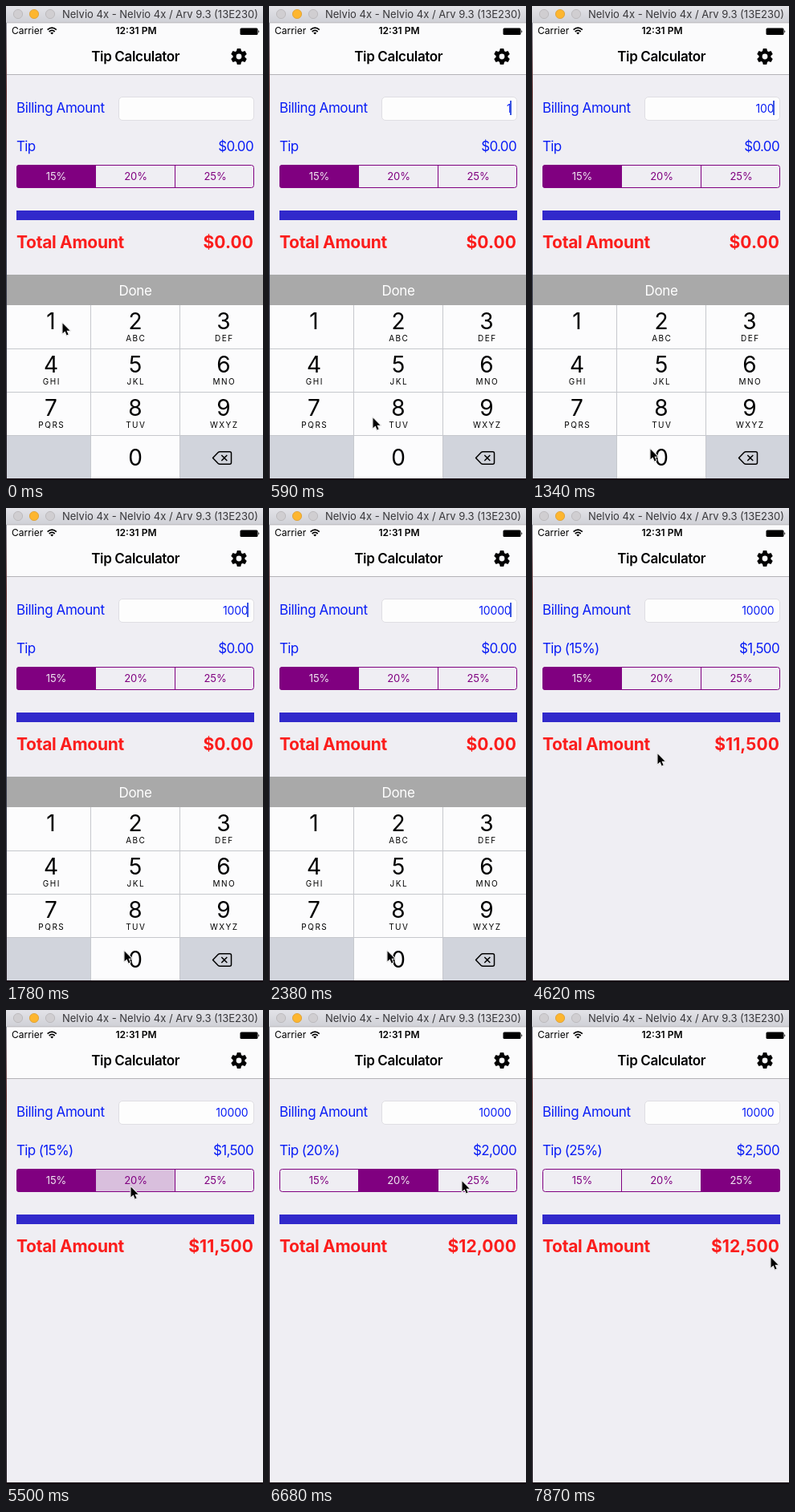
Write an HTML page that moves like this. It is 320x591 px and loops after 8 s.

```html
<!DOCTYPE html>
<html lang="en">
<head>
<meta charset="utf-8">
<title>Tip Calculator</title>
<style>
  html, body { margin: 0; width: 100%; height: 100%; overflow: hidden; background: #efeef3; }
  svg { display: block; width: 320px; height: 591px; font: 17px Inter, "Open Sans", sans-serif; letter-spacing: -.41px; }
  .mid { text-anchor: middle; }
  .end { text-anchor: end; }
  .blue { fill: #0a1ef5; }
  .tip { letter-spacing: -.65px; }
  .total { font-size: 21px; font-weight: 700; letter-spacing: -.3px; fill: #fb1d1c; }
  .total.end { letter-spacing: .1px; }
  .seg { font-size: 13px; letter-spacing: -.08px; }
  .field { font-size: 14px; letter-spacing: -.15px; }
  .status { font-size: 12px; letter-spacing: 0; }
  .window { font-size: 13px; letter-spacing: 0; }
  .digit { font-size: 28px; letter-spacing: 0; }
  .abc { font-size: 10px; letter-spacing: 1.5px; }
  #arrow { filter: drop-shadow(0 .6px .6px #0006); }
</style>
</head>
<body>
<svg viewBox="0 0 320 591">
  <defs>
    <linearGradient id="chrome" x2="0" y2="1">
      <stop stop-color="#e3e3e8"/><stop offset="1" stop-color="#cfd0d6"/>
    </linearGradient>
    <linearGradient id="desk" x2="0" y2="1">
      <stop stop-color="#8a8c98"/><stop offset=".15" stop-color="#5b2a2c"/>
      <stop offset=".5" stop-color="#3c4254"/><stop offset="1" stop-color="#1c141c"/>
    </linearGradient>
    <clipPath id="pill"><rect x="13" y="198" width="296" height="29" rx="3.5"/></clipPath>
    <clipPath id="screen"><rect x="1" y="22" width="319" height="567"/></clipPath>
  </defs>

  <rect width="320" height="591" fill="#efeef3"/>

  <!-- window bar -->
  <rect width="320" height="21" fill="url(#chrome)"/>
  <rect y="20.5" width="320" height="1" fill="#b5b3b6"/>
  <g stroke-width=".8" fill="#d0ced1" stroke="#b6b4b7">
    <circle cx="15" cy="10" r="5.6"/>
    <circle cx="35" cy="10" r="5.6" fill="#fdb62f" stroke="#dc9c2c"/>
    <circle cx="55" cy="10" r="5.6"/>
  </g>
  <text class="window" x="70" y="15" fill="#38373a">Nelvio 4x - Nelvio 4x / Arv 9.3 (13E230)</text>

  <!-- status and navigation -->
  <rect y="21.5" width="320" height="64" fill="#fbfbfc"/>
  <rect y="85" width="320" height="1" fill="#b4b3b7"/>
  <text class="status" x="7" y="35">Carrier</text>
  <g fill="none" stroke="#000" stroke-width="1.7">
    <path d="M51.6 29.6Q57.2 24.6 62.8 29.6M53.7 32Q57.2 28.9 60.7 32"/>
    <path d="M57.2 35.6L55.2 33.4Q57.2 31.9 59.2 33.4Z" fill="#000" stroke="none"/>
  </g>
  <text class="status mid" x="162" y="35" font-weight="600">12:31 PM</text>
  <rect x="291.5" y="27.5" width="22" height="8.5" rx="1.5"/>
  <path d="M314.3 30q2 1.8 0 3.6z"/>
  <text class="mid" x="161.2" y="69" font-weight="600" letter-spacing="-.33">Tip Calculator</text>
  <g id="gear" transform="translate(290 63)">
    <circle r="5.4" fill="none" stroke="#000" stroke-width="4"/>
  </g>

  <!-- form -->
  <text class="blue" x="13" y="133">Billing Amount</text>
  <rect x="140.5" y="113.5" width="168" height="29" rx="4.5" fill="#fdfdfd" stroke="#dfdee3"/>
  <text class="blue field end" id="bill" x="301.5" y="133"></text>
  <rect id="caret" x="300" y="118" width="2" height="18" fill="#3a55e0"/>
  <text class="blue tip" id="tip" x="13" y="181"></text>
  <text class="blue tip end" id="tipSum" x="308" y="181"></text>
  <g id="segments"></g>
  <path d="M111.5 198v29M210.5 198v29" stroke="#800080"/>
  <rect x="13.5" y="198.5" width="295" height="28" rx="3" fill="none" stroke="#800080"/>
  <rect x="13" y="255" width="296" height="12" fill="#3129cb"/>
  <text class="total" x="13" y="302">Total Amount</text>
  <text class="total end" id="total" x="308" y="302"></text>

  <!-- keyboard -->
  <g clip-path="url(#screen)">
    <g id="pad">
      <rect y="335" width="320" height="38" fill="#a9a9a9"/>
      <text class="mid" id="done" x="161" y="361" fill="#fff">Done</text>
      <g id="keys"></g>
      <path d="M105.5 373V589M216.5 373V589M0 427.5H320M0 481.5H320M0 535.5H320" stroke="#c6c8cd"/>
      <path d="M257.5 563.5L264 556.7Q265 555.7 266.5 555.7H278.5Q280.5 555.7 280.5 557.7V569.3Q280.5 571.3 278.5 571.3H266.5Q265 571.3 264 570.3ZM268.3 560l7 7M275.3 560l-7 7"
        fill="none" stroke="#000" stroke-width="1.5" stroke-linejoin="round"/>
    </g>
  </g>

  <rect y="21" width="1" height="570" fill="url(#desk)"/>
  <rect y="589" width="320" height="2" fill="#191217"/>

  <path id="arrow" d="M1.5 1.6V14.3L4.5 11.5L6.6 16.4L8.6 15.5L6.5 10.8H10.6Z" stroke="#fff" stroke-width="2" paint-order="stroke" stroke-linejoin="round"/>
</svg>
<script>
const $ = id => document.getElementById(id);
const add = (parent, tag, attrs, text = "") => {
  const el = document.createElementNS("http://www.w3.org/2000/svg", tag);
  for (const k in attrs) el.setAttribute(k, attrs[k]);
  el.textContent = text;
  return parent.appendChild(el);
};

for (let i = 0; i < 6; i++)
  add($("gear"), "path", { d: "M-3.2-6L-2.2-10H2.2L3.2-6Z", transform: `rotate(${i * 60})` });

// number pad
const WHITE = "#fcfcfd", GREY = "#d1d4dc";
const colX = [0, 106, 217, 320], midX = [56, 161, 271], rowY = [373, 428, 482, 536, 589];
const letters = ["", "ABC", "DEF", "GHI", "JKL", "MNO", "PQRS", "TUV", "WXYZ"];
const keys = {};
for (let i = 0; i < 12; i++) {
  const c = i % 3, r = Math.floor(i / 3);
  const name = i < 9 ? i + 1 : i === 10 ? 0 : "";
  const box = add($("keys"), "rect", {
    x: colX[c], y: rowY[r], width: colX[c + 1] - colX[c], height: rowY[r + 1] - rowY[r],
    fill: name === "" ? GREY : WHITE
  });
  if (name === "") continue;
  keys[name] = box;
  add($("keys"), "text", { class: "digit mid", x: midX[c], y: r < 3 ? 403 + 54 * r : 573 }, name);
  if (letters[i]) add($("keys"), "text", { class: "abc mid", x: midX[c] + .8, y: 418 + 54 * r }, letters[i]);
}

const rates = [15, 20, 25], segX = [13, 111, 210, 309];
const segs = rates.map((rate, i) => ({
  box: add($("segments"), "rect", {
    x: segX[i], y: 198, width: segX[i + 1] - segX[i], height: 29, fill: "#800080", "clip-path": "url(#pill)"
  }),
  label: add($("segments"), "text", { class: "seg mid", x: 62.5 + 99 * i, y: 217 }, rate + "%")
}));

// the screen was sampled in steps, so every track holds its value
const pointer = [
  [0, 69, 394], [300, 92, 435], [450, 128, 512], [600, 146, 551],
  [2530, 147, 536], [2680, 150, 488], [2820, 154, 428], [2970, 158, 376], [3120, 160, 352], [3270, 160, 346],
  [4620, 155, 305], [4770, 154, 256], [4910, 154, 229], [5060, 154, 219],
  [6250, 173, 219], [6400, 206, 217], [6540, 230, 214], [6680, 239, 212],
  [7430, 249, 229], [7580, 273, 269], [7720, 290, 298], [7870, 296, 307]
];
const typed = [[0, ""], [150, "1"], [600, "10"], [890, "100"], [1640, "1000"], [2230, "10000"]];
const pressed = [[0, ""], [150, "1"], [300, ""], [600, "0"], [740, ""], [890, "0"], [1040, ""],
  [1640, "0"], [1780, ""], [2230, "0"], [2380, ""]];
const caretOn = [[0, 0], [150, 1], [2970, 0], [3420, 1], [3720, 0]];
const slide = [[0, 0], [3720, 40], [3870, 205], [4020, 260]];
const chosen = [[0, 0], [5510, 1], [7130, 2]];
const touched = [[0, -1], [5360, 1], [5510, -1], [6980, 2], [7130, -1]];
const rateShown = [[0, 0], [3720, 15], [5650, 20], [7130, 25]];

const at = (track, t) => track.findLast(k => k[0] <= t);
const val = (track, t) => at(track, t)[1];
const money = n => "$" + n.toLocaleString("en-US");

function draw(t) {
  const [, x, y] = at(pointer, t);
  $("arrow").setAttribute("transform", `translate(${x} ${y})`);
  $("bill").textContent = val(typed, t);
  $("caret").setAttribute("opacity", val(caretOn, t));
  $("pad").setAttribute("transform", `translate(0 ${val(slide, t)})`);

  const key = val(pressed, t);
  for (const k in keys) keys[k].setAttribute("fill", k === key ? GREY : WHITE);

  const on = val(chosen, t), touch = val(touched, t);
  segs.forEach(({ box, label }, i) => {
    box.setAttribute("opacity", i === on ? 1 : i === touch ? .2 : 0);
    label.setAttribute("fill", i === on ? "#efe6f0" : "#800080");
  });

  const rate = val(rateShown, t);
  $("tip").textContent = rate ? `Tip (${rate}%)` : "Tip";
  $("tipSum").textContent = rate ? money(100 * rate) : "$0.00";
  $("total").textContent = rate ? money(10000 + 100 * rate) : "$0.00";
}

const start = performance.now();
(function tick() {
  draw((performance.now() - start) % 8000);
  requestAnimationFrame(tick);
})();
</script>
</body>
</html>
```
